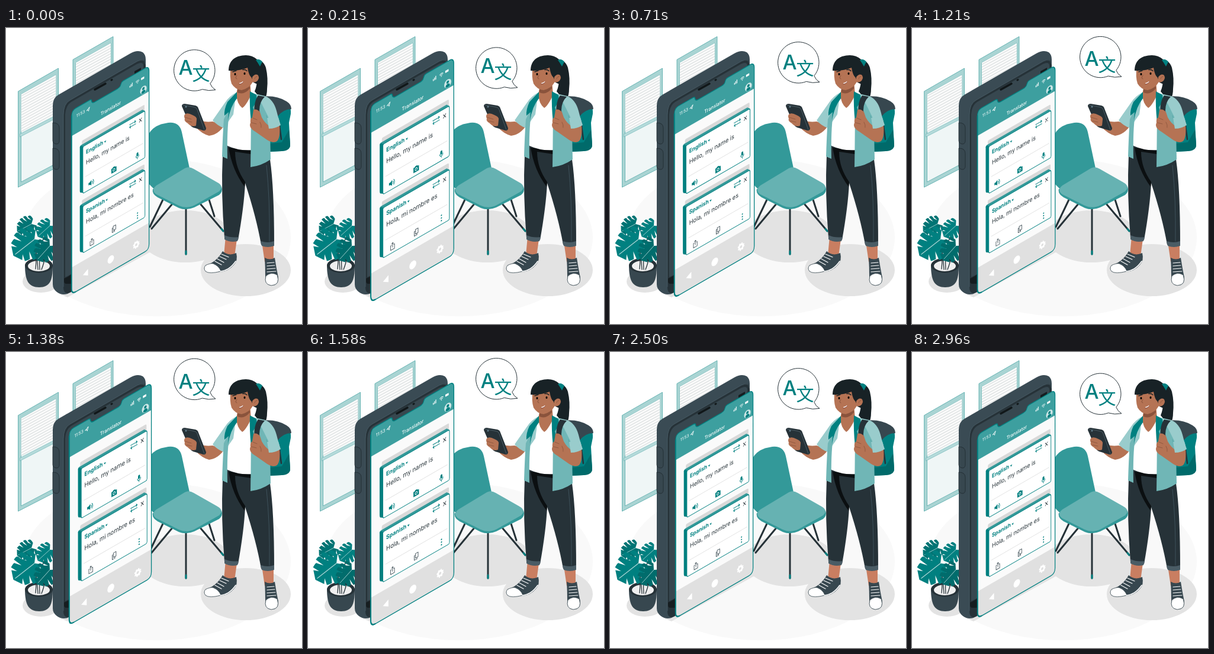
Write an HTML page that moves like this. It is 500x500 px and loops after 3 s.

```html
<!DOCTYPE html>
<html lang="en">
<head>
<meta charset="utf-8">
<title>Translator</title>
<style>
html, body { margin: 0; width: 100%; height: 100%; overflow: hidden; background: #fff; }
svg { display: block; width: 100%; height: 100%; }
text { font-family: Inter, "Noto Sans", sans-serif; }
.line { fill: none; stroke-linecap: round; stroke-linejoin: round; }
.dark { fill: #263238; }
.slate { fill: #37474f; }
.teal { fill: #008080; }
.mid { fill: #339999; }
.soft { fill: #66b2b2; }
.pale { fill: #99cccc; }
.coat { fill: #70b6b6; }
.skin { fill: #b57354; }
.shade { fill: #e3e3e3; }
</style>
</head>
<body>
<svg viewBox="0 0 500 500">
  <defs>
    <g id="window">
      <path d="M0 39L68 0V166L0 201Z" fill="#a9d4d3" stroke="#4da6a6" stroke-width=".8"/>
      <path d="M5 44L64 11V161L5 192Z" fill="#eff6f6" stroke="#5cadad" stroke-width=".8"/>
      <g id="slats"></g>
      <path d="M3 111L65 79V84L3 116Z" fill="#b5dada" stroke="#66b2b2" stroke-width=".6"/>
    </g>
    <g id="card">
      <rect x="21" y="201" width="122" height="40" rx="2" fill="#d9d9d9"/>
      <path class="mid" d="M17 210Q17 207.500 20 207.500H139L144 212V218H23Z"/>
      <path class="teal" d="M17 210Q17 208 20 209L25 213V291L18 287Q17 286 17 283Z"/>
      <rect x="23" y="212" width="121" height="79" rx="2.500" fill="#fff" stroke="#008080"/>
      <path class="line" d="M28 265H140" stroke="#dedede" stroke-width=".8"/>
      <path class="line" d="M114 220.500H126M124 218.500L126 220.500L124 222.500M126 225H114M116 223L114 225L116 227" stroke="#008080"/>
      <path class="line" d="M133 220.500L137.500 226M137.500 220.500L133 226" stroke="#263238" stroke-width=".9"/>
    </g>
  </defs>

  <ellipse cx="255" cy="354" rx="226" ry="133" fill="#f9f9f9"/>
  <ellipse class="shade" cx="405" cy="409" rx="76" ry="44"/>
  <ellipse class="shade" cx="303" cy="352" rx="76" ry="44"/>
  <ellipse class="shade" cx="59" cy="428" rx="31" ry="19"/>
  <path class="shade" d="M90 449L104 455L248 376V350L150 390Z"/>
  <use href="#window" x="20.500" y="68"/>
  <use href="#window" x="113" y="14.500"/>

  <!-- plant -->
  <path class="slate" d="M32 400C32 427 38 438 56 438S79 427 79 400Z"/>
  <ellipse class="dark" cx="55.500" cy="401" rx="23.500" ry="12.500"/>
  <ellipse cx="55.500" cy="402" rx="18.500" ry="9" fill="#efefef"/>
  <path class="line" d="M54 408Q52 370 42 336M57 408Q54 370 70 340M50 407Q52 388 50 364M60 408Q64 398 68 380" stroke="#263238" stroke-width="1.300"/>
  <g id="leaves"></g>

  <!-- chair -->
  <g class="line" stroke="#263238" stroke-width="3">
    <path d="M266 288L243 336M281 297L246 339M329 298L367 343M343 290L352 318M304 304V382"/>
    <path d="M304 377V382M364 339.500L367 343" stroke="#008080"/>
  </g>
  <path class="mid" d="M240 262V181Q246 168 262 162.500L274 160Q293 158 297 176L310 237L252 274Z"/>
  <path class="mid" d="M248 272Q246 280 256 286L292 304Q304 309 318 303L360 282Q367 276 364 268Z"/>
  <path class="soft" d="M254 266L302 237Q309 233 317 238L359 262Q368 268 360 276L319 299Q305 306 292 300L254 281Q244 274 254 266Z"/>

  <!-- phone -->
  <path d="M79 131Q79 118 89 112.500L210 43Q222 36 231 41Q236 45 236 53V368L104 449Q94 452 86 446Q79 441 79 433Z" fill="#3a4b54"/>
  <path class="dark" d="M97 147Q97 128 108 122L222 56Q236 49 236 62V372L108 447Q97 451 97 438Z"/>
  <path class="slate" d="M100 146Q101 131 110 125L221 61Q232 56 232 64V80L112 152V415L100 421Z"/>
  <path class="line" d="M97 437V147Q97 128 108 122L222 56Q235 50 235.500 61" stroke="#4f636d" stroke-width=".7"/>
  <path d="M98 423Q105 421 110 416V432L101 432Q98 431 98 428ZM200 88L217 78V73L228 67V82L200 98Z" fill="#161d20"/>
  <path class="line" d="M150 104L168 94" stroke="#111719" stroke-width="3.500"/>
  <path class="line" d="M178 88L179 87.500" stroke="#111719" stroke-width="3"/>
  <g class="slate" stroke="#202b30" stroke-width=".8">
    <path id="key" d="M79 160Q90 160 90 169V190Q90 196 85 196Q79 195 79 190Z"/>
    <use href="#key" y="43"/>
  </g>

  <g id="screen">
    <g transform="matrix(.866 -.5 0 1 110 0)">
      <path id="glass" d="M1 149Q1 140 9 140H36Q40 140 40 144Q41 148 46 148H90Q96 148 97 144Q98 140 102 140H144Q152 140 152 149V441Q152 450 144 450H9Q1 450 1 441Z" fill="#fafafa"/>
      <clipPath id="cut"><use href="#glass"/></clipPath>
      <g clip-path="url(#cut)">
        <path d="M0 136H153V183H0Z" fill="#3d9f9f"/>
        <path d="M0 405H153V452H0Z" fill="#e0e0e0"/>
      </g>
      <use href="#glass" style="fill-opacity:0" stroke="#008080" stroke-width="1.400"/>
      <path class="line" d="M.8 149V441Q1 450 9 450" stroke="#008080" stroke-width="2"/>

      <g fill="#fff">
        <text x="10.400" y="156.500" font-size="7.200">11:53</text>
        <text x="57.500" y="177" font-size="8.200" font-weight="500">Translator</text>
        <path d="M114 158V155H115.300V158ZM116.300 158V153.500H117.600V158ZM118.600 158V152H119.900V158ZM136.500 153H142.500V156.500H136.500Z"/>
        <path class="line" d="M30.500 155L36 151.500L34 157.500L33 155Z" stroke="#fff" stroke-width=".8"/>
        <path class="line" d="M126.500 154.500Q129.500 152 132.500 154.500M127.800 156.200Q129.500 155 131.200 156.200" stroke="#fff"/>
        <circle cx="129.500" cy="158" r=".7"/>
        <circle cx="141" cy="175" r="6.500" fill="#cce5e5"/>
        <path class="teal" d="M137 179.500Q137 175.500 141 175.500T145 179.500Q141 182.500 137 179.500Z"/>
        <circle class="teal" cx="141" cy="172.800" r="2.300"/>
        <path d="M23 429L33 423.500V434.500Z"/>
        <circle cx="77.400" cy="429.500" r="6.300"/>
        <circle cx="127" cy="429.500" r="5.200" stroke="#fff" stroke-width="2.400" stroke-dasharray="2.050 2.050"/>
        <circle cx="127" cy="429.500" r="2.200" fill="#e0e0e0"/>
      </g>

      <use href="#card"/>
      <use href="#card" y="100.500"/>
      <g class="teal" font-size="9.300" font-weight="700">
        <text x="29" y="227.500">English</text>
        <text x="29" y="327.500">Spanish</text>
        <path d="M64.500 224H68.500L66.500 227ZM67.500 324H71.500L69.500 327Z"/>
      </g>
      <g class="dark" font-size="10.200">
        <text x="29" y="245.500">Hello, my name is</text>
        <text x="29" y="345.500">Hola, mi nombre es</text>
      </g>
      <g class="teal">
        <path d="M34 279H36.500L39.500 276.500V285.500L36.500 283H34Z"/>
        <path class="line" d="M41 279Q42.500 281 41 283M42.700 277Q45.500 281 42.700 285" stroke="#008080"/>
        <path d="M78.500 277.500H80.500L82 276H85L86.500 277.500H88.500V285.500H78.500Z"/>
        <circle cx="83.500" cy="281.300" r="2" fill="#008080" stroke="#fff"/>
        <rect x="127.500" y="275" width="3.600" height="6.500" rx="1.800"/>
        <path class="line" d="M126.300 280Q126.300 283.500 129.300 283.500T132.300 280M129.300 283.500V286" stroke="#008080" stroke-width=".9"/>
        <path class="line" d="M38.500 379.500H37V386.500H44V379.500H42.500M40.500 383V376M39 377.500L40.500 376L42 377.500" stroke="#37474f" stroke-width=".9"/>
        <path class="line" d="M82 376H87V383H82ZM82 378.500H80V385.500H85V383" stroke="#37474f" stroke-width=".9"/>
        <circle cx="129.500" cy="377.300" r="1.100"/><circle cx="129.500" cy="381.500" r="1.100"/><circle cx="129.500" cy="385.700" r="1.100"/>
      </g>
    </g>
  </g>

  <path id="bubble" d="M344.800 93.900A34.700 34.700 0 1 0 331.500 103.600Q342 107 354 104.600Q347.500 101 344.800 93.900Z" fill="#fff" stroke="#263238"/>
  <g id="letters" class="teal" font-weight="500">
    <text x="291.500" y="79" font-size="34">A</text>
    <text x="314.500" y="88" font-size="30" style="font-family:'Noto Sans CJK SC','Noto Sans CJK JP','Noto Sans CJK',sans-serif">文</text>
  </g>

  <!-- traveller -->
  <g>
    <!-- backpack -->
    <path class="teal" d="M444 130L472 125Q482 128 481 145L478 160L480 196Q481 207 466 208L444 209Z"/>
    <path d="M446 195L466 193L478 172L480 196Q481 207 466 208L444 209Z" fill="#006a6a"/>
    <path class="slate" d="M432 116Q456 113 474 124Q482 129 482 137Q468 137 458 150L450 130Z"/>
    <path class="line" d="M461 158L465 188" stroke="#263238" stroke-width="2.500"/>
    <!-- ponytail -->
    <path d="M420 54Q434 52 439 67Q443 84 441 103Q441 114 437 120Q427 117 420 107Q424 98 424 86Z" fill="#182226"/>
    <!-- legs and shoes -->
    <path d="M371 352L390 357L386 386L368 384ZM432 361H452V395H437Z" fill="#c97e61"/>
    <path class="slate" d="M366 377Q376 386 389 380Q392 393 385 400Q376 411 361 412H345Q332 412 337 401Q355 396 366 377Z"/>
    <path d="M337 401Q345 397 350 398Q360 402 363 411Q343 416 337 411Q333 406 337 401Z" fill="#fff" stroke="#37474f" stroke-width=".8"/>
    <path class="line" d="M362 411Q377 410 388 394" stroke="#fff" stroke-width="1.600"/>
    <path class="line" d="M353 394L364 400M357 390L368 396M361 386L372 391M364 382L376 387" stroke="#fff" stroke-width="1.200"/>
    <path class="slate" d="M437 388Q446 393 454 388Q457 408 460 421Q461 435 448 435Q437 434 438 420Q438 404 437 388Z"/>
    <path d="M439 419Q448 411 458 417Q464 434 448 435Q435 433 439 419Z" fill="#fff" stroke="#37474f" stroke-width=".8"/>
    <path class="line" d="M441 397L453 396M441 402L454 401M441 407L455 406M441 412L456 411" stroke="#fff" stroke-width="1.200"/>
    <path class="dark" d="M374 198L415 202L446 222Q453 270 453 366Q442 372 431 366Q423 320 404 262Q402 302 392 358Q380 361 369 354Q363 280 366 214Z"/>
    <path d="M376 202L414 207V213L387 209Q387 236 404 260L403 268Q382 240 376 202Z" fill="#0b0f11"/>
    <path class="line" d="M440 232Q446 290 445 360" stroke="#455a64" stroke-width=".8"/>
    <path d="M369 350Q380 355 393 353L391 360Q379 363 369 357ZM430 360Q442 364 453 360V368Q442 372 432 368Z" fill="#4a5c65"/>
    <!-- shirt, neck -->
    <path d="M384 118L414 108L422 150L416 206Q394 208 374 199Z" fill="#fff"/>
    <path class="skin" d="M392 96L412 88L414 113Q405 132 399 135Q390 128 389 112Z"/>
    <path d="M391 103Q402 107 411 96L412 102Q402 114 391 109Z" fill="#8a533c"/>
    <!-- reaching arm -->
    <path class="skin" d="M320 153Q332 160 349 158L369 164Q359 180 343 182Q331 179 319 166Z"/>
    <path class="pale" d="M389 109Q377 115 370 126L349 156Q357 165 368 169L384 146Z"/>
    <!-- jacket -->
    <path class="coat" d="M384 122L377 146Q373 170 374 221L365 217Q366 182 368 154Z"/>
    <path class="teal" d="M390 108L374 125Q368 138 369 148L376 142L375 156Q379 132 390 119Z"/>
    <path class="pale" d="M416 110L438 115Q452 121 457 140L463 163L446 171L425 168Z"/>
    <path class="coat" d="M414 112L426 116L443 150L446 171L447 222Q431 233 413 235Q414 170 414 112Z"/>
    <path class="teal" d="M412 107L423 113Q425 125 417 134L420 143L414 160Q411 130 412 107Z"/>
    <path class="line" d="M446 170L440 148" stroke="#5aa9a9"/>
    <!-- strap and bent arm -->
    <path class="dark" d="M426 114L437 116Q428 125 428 139L430 158L421 159Q416 127 426 114Z"/>
    <path class="skin" d="M418 138Q424 136 429 142L432 151Q438 162 446 166L462 164Q464 184 458 191Q452 196 441 189L421 175Q409 168 413 160Q412 153 416 151Z"/>
    <path class="line" d="M417 152L424 155M415 160L423 162M429 159Q432 164 431 168" stroke="#8a533c" stroke-width=".8"/>
    <path class="pale" d="M441 152L460 151L464 164Q455 170 444 170Z"/>
    <!-- handset -->
    <path class="dark" d="M297 132Q297 128 302 128L320 131Q324 132 325 136L338 169Q338 174 333 173L316 168Q312 166 310 162Z"/>
    <path class="line" d="M299 130L319 134Q322 135 323 138L335 172" stroke="#52646d" stroke-width=".8"/>
    <circle cx="304" cy="133" r="1.500" fill="#607d8b"/>
    <path class="skin" d="M302 146Q306 142 315 147Q323 150 322 155L321 165Q313 168 307 161Q300 157 302 153Q300 149 302 146Z"/>
    <path class="line" d="M303 151L313 154M305 157L314 159" stroke="#8a533c" stroke-width=".8"/>
    <!-- head -->
    <path class="skin" d="M380 64Q377 82 381 94Q387 104 398 105Q411 102 417 91L420 70L408 58Z"/>
    <path d="M376 72Q376 54 392 48Q412 42 424 53Q432 62 430 78L427 96L418 92L415 84Q410 80 408 67Q394 73 376 72Z" fill="#182226"/>
    <path class="skin" d="M416 83Q420 77 425 79Q429 83 425 89Q421 93 416 91Z"/>
    <path class="teal" d="M422 54Q428 51 433 57L429 65Q425 58 422 54Z"/>
    <g class="line" stroke="#182226" stroke-width="1.400">
      <path d="M383 74L389 72M400 70.500Q404 69.500 407 72.500"/>
      <path d="M390 80Q386 85 390 86" stroke="#8a533c" stroke-width="1"/>
      <path d="M395 93.500Q398 93 400 91" stroke="#fff" stroke-width="1.600"/>
      <path d="M394 95Q398 95 401 91" stroke="#7f3d35" stroke-width=".8"/>
      <path d="M420 86Q421 82 424 82" stroke="#8a533c" stroke-width=".8"/>
    </g>
    <ellipse cx="387" cy="78" rx="1.500" ry="2"/><ellipse cx="403" cy="77" rx="1.500" ry="2"/>
  </g>
</svg>
<script>
const $ = id => document.getElementById(id);

let slats = '<path d="M5 44L64 11V78L5 107Z" fill="#fafafa"/>';
for (let y = 47; y < 107; y += 4.6) {
  slats += `<path d="M5 ${y}L64 ${y - 32}" stroke="#d2d8d8" stroke-width="1"/>`;
}
$('slats').innerHTML = slats;

// Lobed leaf pointing down, with its stem joint at the origin.
function leaf(x, y, size, turn, color) {
  const side = s => {
    let lobes = '';
    for (let i = 0; i < 4; i++) {
      const top = -.25 + i * .29;
      const w = .68 * Math.sin(.95 + i * .48);
      lobes += `Q${s * (w + .1)} ${top} ${s * w} ${top + .24}` +
        `L${s * w * .4} ${top + .14}L${s * w * .78} ${top + .3}`;
    }
    return `<path d="M0 0L${s * .25} -.25${lobes}L0 1.1Z" fill="${color}"/>`;
  };
  return `<g transform="translate(${x} ${y}) rotate(${turn}) scale(${size})">
    ${side(1)}${side(-1)}
    <path d="M0 0V1" stroke="#b2d8d8" stroke-width=".025"/></g>`;
}
$('leaves').innerHTML =
  leaf(43, 331, 25, 62, '#007474') +
  leaf(74, 334, 25, 48, '#008080') +
  leaf(48, 357, 41, 52, '#008080') +
  leaf(74, 368, 30, 42, '#006c6c');

const keys = [[0, 1], [.1, 1.1], [.3, 1], [.4, 1], [.5, 1.1], [.6, 1], [1, 1]];
function pulse(p) {
  const i = keys.findIndex(k => k[0] > p);
  const [a, from] = keys[i - 1], [b, to] = keys[i];
  return from + (to - from) * (p - a) / (b - a);
}

const move = (id, value) => $(id).setAttribute('transform', value);

function draw(now) {
  const p = now % 3000 / 3000;
  const rise = 1 - Math.abs(2 * p - 1);
  move('screen', `translate(176.3 258) scale(${pulse(p)}) translate(-176.3 -258)`);
  move('bubble', `translate(0 ${-27.8 * rise})`);
  move('letters', `translate(0 ${-19 * rise})`);
}
const start = performance.now();
function tick() {
  draw(performance.now() - start);
  requestAnimationFrame(tick);
}
tick();
</script>
</body>
</html>
```
